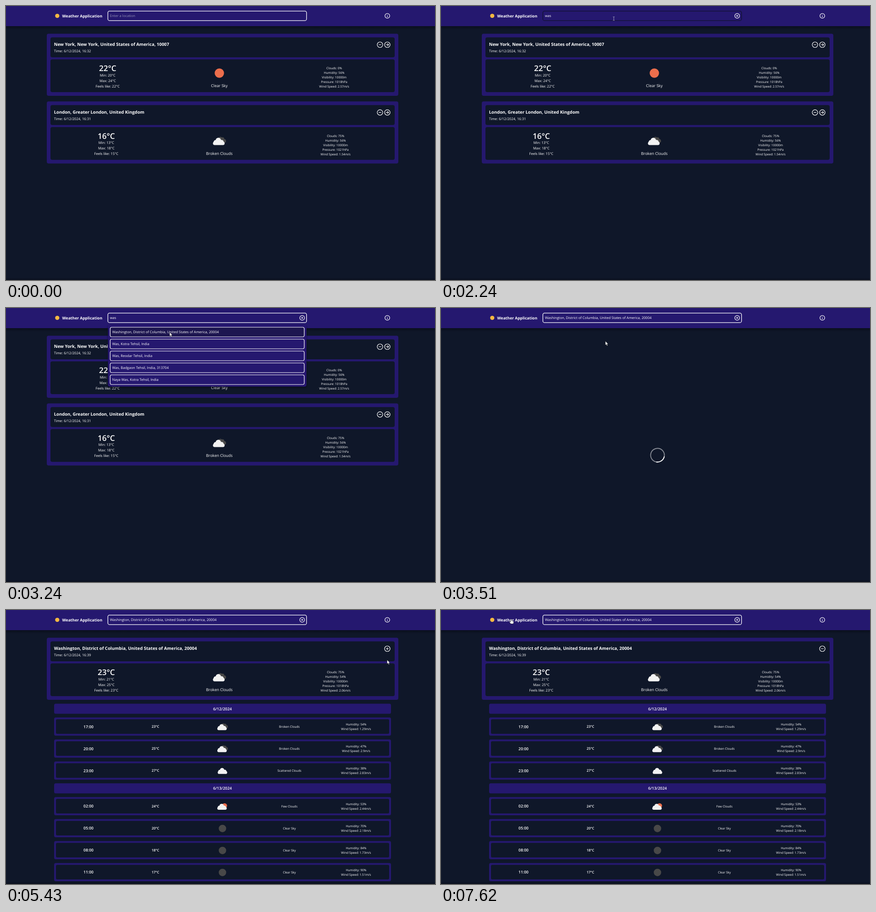
Write an HTML page that moves like this. It is 936 px wide and 598 px high and loops after 8000 ms.

```html
<!DOCTYPE html>
<html lang="en">
<head>
<meta charset="utf-8">
<title>Weather Application</title>
<style>
  html, body { margin: 0; width: 100%; height: 100%; overflow: hidden; background: #0f1729; }
  svg { display: block; width: 936px; height: 598px; }
  text { font-family: "Open Sans", "Noto Sans", sans-serif; fill: #fff; text-rendering: geometricPrecision; white-space: pre; }
</style>
</head>
<body>
<svg id="stage" viewBox="0 0 936 598" xmlns="http://www.w3.org/2000/svg"></svg>
<script>
const LOOP = 8000, TICK = 66.4, FIRST_MOVE = 120;
const NAVY = '#0f1729', PURPLE = '#25186f', PLACE = 'Washington, District of Columbia, United States of America, 20004';

// Markup helpers
const rect = (x, y, w, h, r, fill, extra = '') =>
  `<rect x="${x}" y="${y}" width="${w}" height="${h}" rx="${r}" fill="${fill}" ${extra}/>`;
const circle = (x, y, r, fill) => `<circle cx="${x}" cy="${y}" r="${r}" fill="${fill}"/>`;
const group = (id, content, hidden) => `<g id="${id}"${hidden ? ' display="none"' : ''}>${content}</g>`;
const text = (x, y, size, str, { weight = 400, anchor = 'start', extra = '' } = {}) =>
  `<text x="${x}" y="${y + size * 0.345}" font-size="${size * 0.95}" font-weight="${weight}" text-anchor="${anchor}" ${extra}>${str}</text>`;
const centered = (x, y, size, str, weight = 400) => text(x, y, size, str, { weight, anchor: 'middle' });
const lines = (d, width = 1.3) =>
  `<path d="${d}" fill="none" stroke="#fff" stroke-width="${width}" stroke-linecap="round" stroke-linejoin="round"/>`;

const glyphs = {
  minus: 'M-2.4 0H2.4',
  plus: 'M-2.4 0H2.4M0 -2.4V2.4',
  arrow: 'M-2.7 0H2.7M.4 -2.4L2.8 0L.4 2.4',
  clear: 'M-1.4 -1.4L1.4 1.4M1.4 -1.4L-1.4 1.4',
  info: 'M0 -.3V2.4M0 -2.3V-2.2'
};
const button = (x, y, glyph, r = 6) =>
  `<g transform="translate(${x} ${y})"><circle r="${r}" fill="none" stroke="#fff" stroke-width="1.2"/>${lines(glyphs[glyph], 1.15)}</g>`;

// Weather icons
const cloud = (fill) => rect(-14, 1.2, 25.5, 7.6, 3.8, fill) + circle(-8.2, 2.2, 4.4, fill) +
  circle(-2.2, -1.3, 5.9, fill) + circle(4.6, 2.2, 4.8, fill);
const icons = {
  'Clear Sky': circle(0, -0.5, 10.2, '#ec6e4c'),
  'Clear Night': circle(0, 0, 10, '#484848'),
  'Broken Clouds': circle(2.2, -4.8, 4.4, '#484848') + circle(7, -4.6, 3.6, '#484848') +
    circle(10.4, -.4, 4.2, '#484848') + rect(0, -2, 14, 5.8, 2.9, '#484848') + cloud('#f2f2f2'),
  'Scattered Clouds': `<g transform="translate(1.2 -.5)">${cloud('#f2f2f2')}</g>`,
  'Few Clouds': circle(5.6, -2, 6.8, '#ec6e4c') + cloud('#f2f2f2')
};
const icon = (x, y, name, scale = 1) => `<g transform="translate(${x} ${y}) scale(${scale})">${icons[name]}</g>`;

function card(y, c) {
  const temps = [`Min: ${c.min}°C`, `Max: ${c.max}°C`, `Feels like: ${c.feels}°C`];
  const facts = [`Clouds: ${c.clouds}%`, `Humidity: ${c.humidity}%`, 'Visibility: 10000m',
    `Pressure: ${c.pressure}hPa`, `Wind Speed: ${c.wind}m/s`];
  return `<g transform="translate(0 ${y})">` +
    rect(89, 0, 767, 135.5, 4, PURPLE) + rect(97, 8, 751, 43.5, 4, NAVY) + rect(97, 56, 751, 71.5, 4, NAVY) +
    text(104.7, 23.5, 10, c.place, { weight: 700 }) + text(104.7, 38.2, 8, `Time: 6/12/2024, ${c.time}`) +
    centered(c.tempX, 75, 18, `${c.temp}°C`, 600) +
    temps.map((s, i) => centered(c.tempX, 90.3 + 12 * i, 8, s)).join('') +
    icon(465.5, 86.5, c.sky) + centered(465.5, 113.3, 9, c.sky) +
    facts.map((s, i) => centered(c.factX, 75 + 10 * i, 7, s)).join('') + '</g>';
}

const dateBar = (y, date) => rect(105, y - 11, 735, 22, 3.5, PURPLE) + centered(472.3, y, 9, date, 600);
function forecastRow(y, [time, temp, sky, humidity, wind]) {
  return rect(105, y - 20, 735, 39.8, 3.5, PURPLE) + rect(109, y - 16, 727, 31.8, 3, NAVY) +
    centered(180, y, 9, time, 600) + centered(326, y, 8, `${temp}°C`, 600) +
    icon(472.3, y + .5, sky, .81) + centered(618.3, y, 7, sky.replace('Night', 'Sky')) +
    centered(763.8, y - 5, 7, `Humidity: ${humidity}%`) + centered(763.8, y + 5, 7, `Wind Speed: ${wind}m/s`);
}

const today = [['17:00', 23, 'Broken Clouds', 54, 1.29], ['20:00', 25, 'Broken Clouds', 47, 2.9],
  ['23:00', 27, 'Scattered Clouds', 38, 2.83]];
const tomorrow = [['02:00', 24, 'Few Clouds', 53, 2.44], ['05:00', 20, 'Clear Night', 70, 2.18],
  ['08:00', 18, 'Clear Night', 84, 1.73], ['11:00', 17, 'Clear Night', 90, 1.51]];
const rows = (list, y) => list.map((row, i) => forecastRow(y + 48 * i, row)).join('');

const saved = card(60.5, { place: 'New York, New York, United States of America, 10007', time: '16:32', temp: 22, min: 20,
    max: 24, feels: 22, sky: 'Clear Sky', clouds: 0, humidity: 56, pressure: 1018, wind: 2.57, tempX: 221.8, factX: 716 }) +
  card(208.3, { place: 'London, Greater London, United Kingdom', time: '16:31', temp: 16, min: 13,
    max: 18, feels: 15, sky: 'Broken Clouds', clouds: 75, humidity: 56, pressure: 1021, wind: 1.54, tempX: 218.8, factX: 719 }) +
  [84.5, 232.3].map(y => button(816, y, 'minus') + button(832, y, 'arrow')).join('');

const detail = card(60.5, { place: PLACE, time: '16:39', temp: 23, min: 21, max: 25, feels: 23, sky: 'Broken Clouds',
    clouds: 75, humidity: 54, pressure: 1018, wind: 2.06, tempX: 218.8, factX: 719 }) +
  dateBar(215.5, '6/12/2024') + rows(today, 254.5) + dateBar(389.3, '6/13/2024') + rows(tomorrow, 428.3) +
  group('add', button(832, 84.5, 'plus')) + group('remove', button(832, 84.5, 'minus'));

const options = [PLACE, 'Was, Kotra Tehsil, India', 'Was, Reodar Tehsil, India',
  'Was, Badgaon Tehsil, India, 313704', 'Naya Was, Kotra Tehsil, India'];
const menu = rect(222.5, 36.5, 433, 135, 4, PURPLE, 'filter="url(#soft)"') + options.map((s, i) =>
  rect(227.3, 42 + 26 * i, 423.4, 21, 3.5, PURPLE, `id="option${i}" stroke="#fff" stroke-width="1.2"`) +
  text(231.7, 52.6 + 26 * i, 8, s)).join('');

const header = rect(0, 44, 936, 8, 0, 'url(#shade)') + rect(0, 0, 936, 44, 0, PURPLE) +
  circle(111.8, 21.5, 4.6, '#f5b942') + text(122.5, 21.7, 9, 'Weather Application', { weight: 700 }) +
  rect(222.3, 11.1, 433.4, 20.8, 3.5, PURPLE, 'id="field" stroke-width="1.3"') +
  text(226.7, 21.6, 8, '', { extra: 'id="query"' }) +
  rect(0, 16.4, .6, 10.4, 0, '#fff', 'id="caret"') +
  group('clear', button(646.2, 21.5, 'clear', 5.2)) + button(832, 21.5, 'info', 5.2);

const outline = 'fill="#fff" stroke="#111" stroke-width=".5" stroke-linejoin="round"';
const pointers = {
  arrow: `<path d="M0 0V8.6L2 6.8L3.4 9.9L4.9 9.2L3.5 6.2H6.2Z" ${outline}/>`,
  beam: `<path d="M-1.8 -4Q0 -4 0 -3.2Q0 -4 1.8 -4M0 -3.2V3.2M-1.8 4Q0 4 0 3.2Q0 4 1.8 4" fill="none" stroke="#d5d3e2" stroke-width=".7"/>`,
  hand: `<path d="M-1 1Q0 -.6 1 1V4L5 5Q6 5.3 5.8 6.6L5 10.6H-.6L-3.4 6.8Q-3.4 5.4 -2 5.9L-1 6.8Z" ${outline}/>`
};

const stage = document.getElementById('stage');
stage.innerHTML = `<defs>
  <linearGradient id="shade" x2="0" y2="1"><stop stop-color="#080c18" stop-opacity=".75"/><stop offset="1" stop-color="#080c18" stop-opacity="0"/></linearGradient>
  <linearGradient id="foot" x2="0" y2="1"><stop stop-color="#080c18" stop-opacity="0"/><stop offset="1" stop-color="#080c18" stop-opacity=".7"/></linearGradient>
  <filter id="soft" x="-5%" y="-10%" width="110%" height="120%"><feDropShadow dx="0" dy="2" stdDeviation="2" flood-color="#000" flood-opacity=".45"/></filter>
  </defs>` + rect(0, 0, 936, 598, 0, NAVY) + group('saved', saved) + group('detail', detail, true) +
  group('loader', `<circle r="15" fill="none" stroke="#878b95" stroke-width="1.9"/>
    <path d="M15 0A15 15 0 0 1 0 15" fill="none" stroke="#fff" stroke-width="1.9"/>`, true) +
  header + group('menu', menu, true) + rect(0, 593, 936, 5, 0, 'url(#foot)') +
  group('pointer', Object.entries(pointers).map(([id, art]) => group(id, art)).join(''));

const $ = id => document.getElementById(id);
const show = (id, on) => $(id).setAttribute('display', on ? 'inline' : 'none');

// Pointer path: [time, x, y]
const path = [[120, 845, 549], [850, 380, 24], [1845, 380, 24], [2040, 377, 27.5], [2575, 377, 27.5], [2910, 357, 53],
  [3310, 357, 53], [3510, 358.7, 72.5], [3580, 378.7, 112.7], [3710, 400, 137], [4505, 400, 137], [4640, 401, 141],
  [4905, 401, 141], [5430, 831.5, 109], [5690, 832, 82], [5895, 832, 82], [6360, 484, 130], [6555, 484, 130],
  [7420, 151.5, 22.5], [7620, 152.8, 19.5]];

function pointerAt(t) {
  const next = path.findIndex(p => p[0] > t);
  if (next < 0) return path[path.length - 1].slice(1);
  if (next === 0) return path[0].slice(1);
  const [t0, x0, y0] = path[next - 1], [t1, x1, y1] = path[next];
  const u = (t - t0) / (t1 - t0), e = u * u * (3 - 2 * u);
  return [x0 + (x1 - x0) * e, y0 + (y1 - y0) * e];
}

const inside = (x, y, l, t, r, b) => x > l && x < r && y > t && y < b;
function pointerKind(x, y) {
  if (inside(x, y, 222, 11, 656, 32.5)) return 'beam';
  if (inside(x, y, 825, 78, 839, 91) || inside(x, y, 105, 14, 211, 29)) return 'hand';
  return 'arrow';
}

function render(t) {
  const typed = t >= 3310 ? PLACE : 'was'.slice(0, (t >= 1380) + (t >= 1510) + (t >= 1710));
  const query = $('query');
  if (query.textContent !== (typed || 'Enter a location')) query.textContent = typed || 'Enter a location';
  query.style.fill = typed ? '#fff' : '#9693b6';
  show('clear', typed);

  const focused = t >= 990 && t < 3240;
  $('field').setAttribute('stroke', !focused ? '#fff' : t < 1050 ? '#77749a' : '#11122f');
  show('caret', (t >= 1050 && t < 2240) || (t >= 2740 && t < 3240));
  $('caret').setAttribute('x', 226.7 + (typed ? query.getComputedTextLength() : 0));

  const tick = Math.floor((t - FIRST_MOVE) / TICK + .2);
  const [x, y] = pointerAt(FIRST_MOVE + tick * TICK);
  const kind = pointerKind(x, y);
  show('pointer', t >= FIRST_MOVE);
  $('pointer').setAttribute('transform', `translate(${x} ${y})`);
  for (const id in pointers) show(id, id === kind);

  show('menu', t >= 2370 && t < 3310);
  $('option0').setAttribute('fill', inside(x, y, 227, 42, 651, 63) ? '#1d1650' : PURPLE);
  show('saved', t < 3380);
  show('loader', t >= 3380 && t < 3580);
  $('loader').setAttribute('transform', `translate(472.4 321.2) rotate(${10 + (t - 3510) * .36})`);
  show('detail', t >= 3580);
  show('add', t < 5960);
  show('remove', t >= 5960);
}

const start = performance.now();
function frame() {
  render((performance.now() - start) % LOOP);
  requestAnimationFrame(frame);
}
frame();
</script>
</body>
</html>
```
